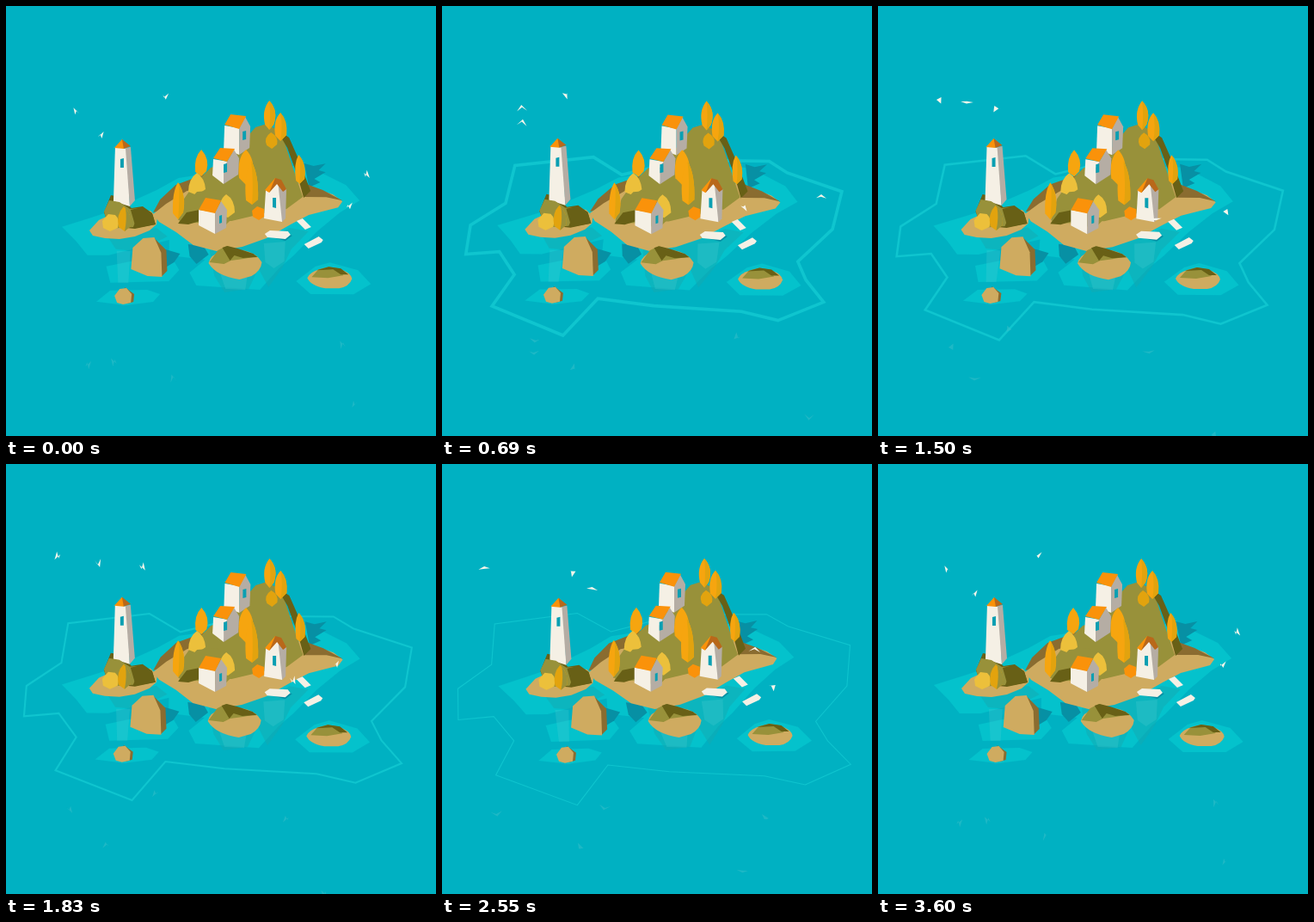
Animation, 500 px wide and 500 px high, one loop 3630 ms. Source, as an HTML page:

```html
<!DOCTYPE html>
<html lang="en">
<head>
<meta charset="utf-8">
<title>Island</title>
<style>
html, body { margin: 0; width: 100%; height: 100%; overflow: hidden; background: #00b1c2 }
svg { display: block; width: 100vw; height: 100vh }
.shallow { fill: #04c2cc }
.deep { fill: #0790a4 }
.mirror { fill: #14a9b2; fill-opacity: .5 }
.pale { fill: #4fcfd3; fill-opacity: .25 }
.sand { fill: #cfab60 }
.brown { fill: #8a6c30 }
.grass { fill: #98913a }
.moss { fill: #686016 }
.roof { fill: #fa920a }
.rust { fill: #b9681a }
.wall { fill: #f5f0e5 }
.shade { fill: #b5ada4 }
.glass { fill: #0a9fb2 }
.orange { fill: #f6a50f }
.amber { fill: #e2a30e }
.yellow { fill: #ecc03b }
</style>
</head>
<body>
<svg viewBox="0 0 500 500">
  <polygon id="ring" fill="none" stroke="#0fc5cf" points="38,255 77,230 86,187 175,177 208,197 280,180 375,181 396,194 459,215 450,258 412,295 422,316 443,341 392,362 350,352 250,346 186,338 148,380 66,347 90,311 72,285 34,288"/>

  <g class="flat">
    <g class="shallow">
      <polygon points="65,257 100,246 118,240 175,214 200,200 300,185 352,187 395,208 411,226 388,240 362,262 335,290 318,305 296,330 222,325 214,310 232,295 190,290 190,272 170,277 120,290 95,290 82,274"/>
      <polygon points="117,303 145,297 196,297 202,307 190,320 122,322"/>
      <polygon points="106,344 122,331 165,330 180,335 172,344 140,348"/>
      <polygon points="338,320 360,303 377,298 410,307 425,323 405,335 355,335"/>
    </g>
    <polygon class="deep" points="346,183 357,186 371,183 363,191 371,193 358,201 365,205 352,211"/>
    <polygon class="deep" points="212,277 230,279 236,289 222,300 214,291"/>
    <polygon class="mirror" points="118,268 175,258 188,268 170,277 160,286 128,283"/>
    <polygon class="mirror" points="237,284 275,279 305,270 330,258 352,262 332,283 322,304 306,327 294,305 283,329 255,333 243,314"/>
    <polygon class="pale" points="129,285 145,285 143,322 131,322"/>
    <polygon class="pale" points="300,276 325,274 324,297 312,305 302,298"/>
    <polygon class="pale" points="250,312 281,316 279,330 256,329"/>
  </g>

  <g class="flat">
    <polygon class="brown" points="171,240 179,225 197,208 240,192 245,215 205,232"/>
    <polygon class="sand" points="171,242 186,230 210,215 300,200 345,207 380,219 391,227 386,234 352,243 331,254 303,270 275,280 245,285 218,278 198,263 178,251"/>
    <polygon class="brown" points="346,206 368,214 391,226 372,222 346,222"/>
  </g>

  <g data-at="290,235">
    <polygon class="grass" points="200,249 207,224 219,207 238,188 258,181 283,149 290,141 303,137 320,147 334,190 345,222 326,236 300,241 262,250"/>
    <polygon class="moss" points="314,143 329,153 340,178 354,215 346,223 339,198 327,165"/>
    <path class="orange" d="M306 110q-9 11-5 28l5 6 5-6q6-16-5-28M319 124q-9 9-6 27l6 6 7-7q1-16-7-26M340 173q-6 11-3 30l4 4 6-6q2-19-7-28M227 167q-9 9-7 26l7 5 6-6q4-14-6-25"/>
    <path class="amber" d="M306 110q11 12 5 28l-5 6q2-16 0-34M308 147q-9 6-5 15l6 4 6-5q2-9-7-14M319 124q9 9 7 26l-7 7q3-17 0-33M341 174q9 11 6 27l-6 6q2-18 0-33"/>
    <polygon class="wall" points="254,139 271,142 271,173 253,166"/>
    <polygon class="shade" points="271,142 278,129 284,140 283,165 271,173"/>
    <polygon class="roof" points="254,138 261,126 279,128 271,143"/>
    <polygon class="glass" points="275,146 279,145 279,155 275,156"/>
  </g>

  <g data-at="270,246">
    <path class="orange" d="M279 167q-11 10-8 33l8 8 8-8q3-22-8-33"/>
    <path class="orange" d="M285 180q-9 17-6 46l7 5 7-6q1-30-8-45"/>
    <path class="amber" d="M285 180q9 15 8 45l-7 6q2-26-1-51"/>
    <polygon class="wall" points="241,178 258,181 253,207 240,197"/>
    <polygon class="shade" points="257,181 265,167 271,177 270,196 253,207 253,188"/>
    <polygon class="roof" points="241,177 249,165 266,166 257,181"/>
    <polygon class="glass" points="253,184 257,183 257,193 253,194"/>
    <path class="yellow" d="M222 194q-10 7-10 22l10 4 10-7q-1-13-10-19"/>
    <polygon class="grass" points="205,234 222,216 245,214 260,224 264,246 252,258 224,252 201,253"/>
    <polygon class="moss" points="200,253 210,240 225,237 225,250 212,254"/>
    <path class="yellow" d="M256 219q-10 7-6 24l8 3 8-6q0-15-10-21"/>
    <path class="orange" d="M200 205q-7 11-6 36l6 7 6-8q4-20-6-35"/>
    <path class="amber" d="M201 206q8 14 5 34l-6 8q2-20 1-42"/>
    <polygon class="wall" points="224,237 243,240 243,265 224,255"/>
    <polygon class="shade" points="243,240 250,227 257,237 256,258 243,265"/>
    <polygon class="roof" points="224,237 232,223 250,226 243,241"/>
    <polygon class="glass" points="248,244 251,243 251,252 248,253"/>
    <path class="roof" d="M292 233l-6 5 1 7 7 4 6-4v-9z"/>
    <polygon class="wall" points="302,214 315,201 322,214 321,251 300,247"/>
    <polygon class="shade" points="316,203 326,213 325,247 321,251"/>
    <polygon class="roof" points="301,214 313,200 317,203 306,217"/>
    <polygon class="rust" points="313,200 320,202 326,213 322,216 315,207 306,217"/>
    <polygon class="glass" points="310,223 314,223 314,235 310,234"/>
  </g>

  <g data-at="330,262">
    <polygon class="deep" points="302,267 325,273 333,267 328,265"/>
    <polygon class="wall" points="301,265 307,261 328,262 331,266 325,271 304,269"/>
    <polygon class="wall" points="338,250 345,247 355,257 348,260"/>
  </g>
  <g data-at="358,280">
    <polygon class="wall" points="347,277 364,268 369,272 367,275 352,282"/>
  </g>

  <g data-at="137,256">
    <path class="sand" d="M97 261L108 249 125 241 168 238 176 246 175 254 167 261 150 268 132 271 115 270 101 267z"/>
    <polygon class="moss" points="114,240 122,220 133,222 146,235 159,233 170,241 174,254 150,259 120,256"/>
    <polygon class="wall" points="127,164 141,166 144,233 125,227"/>
    <polygon class="shade" points="139,165 145,164 150,226 144,233"/>
    <polygon class="roof" points="126,165 135,155 139,159 137,166"/>
    <polygon class="rust" points="135,155 145,163 137,166"/>
    <polygon class="glass" points="133,178 137,177 137,188 133,188"/>
    <polygon class="grass" points="114,239 120,226 132,228 144,236 157,235 148,257 120,259"/>
    <polygon class="moss" points="145,237 158,234 170,241 174,254 151,258"/>
    <path class="yellow" d="M119 242l-7 8 1 8 8 4 9-4q3-10-3-15z"/>
    <path class="amber" d="M137 233q-9 9-6 24l7 5 7-6q2-14-8-23"/>
    <path class="grass" d="M139 235q8 9 6 21l-7 6q3-14 1-27"/>
  </g>

  <g data-at="167,310">
    <polygon class="deep" points="186,283 203,288 196,298 186,304"/>
    <polygon class="brown" points="172,269 187,284 188,308 181,315 165,300"/>
    <polygon class="sand" points="146,306 148,281 160,270 173,269 181,287 182,315 165,314"/>
  </g>
  <g data-at="267,303">
    <path class="sand" d="M236 299Q238 289 252 285L276 284Q292 287 298 298 297 308 286 314L272 318Q245 314 236 299"/>
    <polygon class="grass" points="237,298 247,284 257,279 270,283 293,291 277,294 262,296 254,300"/>
    <polygon class="moss" points="252,281 258,279 270,282 288,288 293,292 276,293 266,290 261,296"/>
  </g>
  <g data-at="377,317">
    <path class="sand" d="M351 316Q354 309 365 306L390 306Q402 310 403 317 400 326 388 328L372 328Q355 325 351 316"/>
    <polygon class="grass" points="356,315 364,306 376,303 388,305 393,313 375,316"/>
    <polygon class="moss" points="362,307 376,303 390,305 399,312 390,312 381,306"/>
  </g>
  <g data-at="138,338">
    <polygon class="brown" points="139,327 150,335 149,344 142,346"/>
    <polygon class="sand" points="127,337 133,329 141,328 147,335 146,345 137,347 130,345"/>
  </g>
  <g id="flock"></g>
</svg>
<script>
const LOOP = 3630, TAU = Math.PI * 2, RAD = Math.PI / 180;
const ring = document.getElementById('ring');
const flock = document.getElementById('flock');
const flats = document.querySelectorAll('.flat');
const solids = [...document.querySelectorAll('[data-at]')].map(el => [el, ...el.dataset.at.split(',').map(Number)]);

// centre, radii, start angle, direction, offset of the reflection
const birds = [
  [402, 218, 39, 21, -63, 1, -14, 260],
  [366, 245, 44, 14, -42, -1, -8, 155],
  [146, 113, 43, 12, -25, -1, 9, 322],
  [71, 118, 22, 9, 60, -1, 14, 288],
  [134, 138, 42, 19, 125, 1, 15, 257]
].map(orbit => ({ orbit, image: addBird('#39bfca', .5), body: addBird('#f6f5ea', 1) }));

function addBird(fill, opacity) {
  const el = document.createElementNS('http://www.w3.org/2000/svg', 'polygon');
  el.setAttribute('fill', fill);
  el.setAttribute('opacity', opacity);
  return flock.appendChild(el);
}

// Turning the view skews the ground about the island's centre.
const ground = turn => `matrix(1 ${.013 * turn} ${-.12 * turn} 1 ${30 * turn} ${-3.25 * turn})`;

function wings(x, y, heading, lift) {
  const hx = Math.cos(heading), hy = Math.sin(heading);
  const flat = Math.cos(lift) * 7.5, up = Math.sin(lift) * 7.5;
  const point = (side, along, height) =>
    `${x - hy * side + hx * along},${y + (hx * side + hy * along) * .5 - height}`;
  return [point(flat, -2, up), point(0, 3.5, 0), point(-flat, -2, up), point(0, -2, 0)].join(' ');
}

function draw(now) {
  const t = now % LOOP, phase = TAU * t / LOOP;
  const turn = .08 + .785 * (Math.sin(phase - .1) + Math.sin(.1));

  flats.forEach(el => el.setAttribute('transform', ground(turn)));
  for (const [el, x, y] of solids)
    el.setAttribute('transform', `translate(${-.12 * (y - 250) * turn} ${.013 * (x - 250) * turn})`);

  const scale = .995 + .04 * t / 1000 - .2 * Math.exp(-t / 120);
  ring.setAttribute('transform', `${ground(turn - .54)} translate(250 225) scale(${scale}) translate(-250 -225)`);
  ring.setAttribute('stroke-width', Math.max(0, 4.5 * (1 - t / 3260)));
  ring.setAttribute('opacity', Math.min(1, t / 250));

  const lift = .2 + .85 * Math.cos(phase * 8);
  for (const { orbit: [cx, cy, rx, ry, start, dir, mx, my], body, image } of birds) {
    const angle = start * RAD + dir * phase;
    const x = cx + rx * Math.cos(angle), y = cy + ry * Math.sin(angle);
    const heading = angle + dir * Math.PI / 2;
    body.setAttribute('points', wings(x, y, heading, lift));
    image.setAttribute('points', wings(x + mx, y + my, heading, -lift));
  }
}

const begin = performance.now();
(function frame() {
  draw(performance.now() - begin);
  requestAnimationFrame(frame);
})();
</script>
</body>
</html>
```
